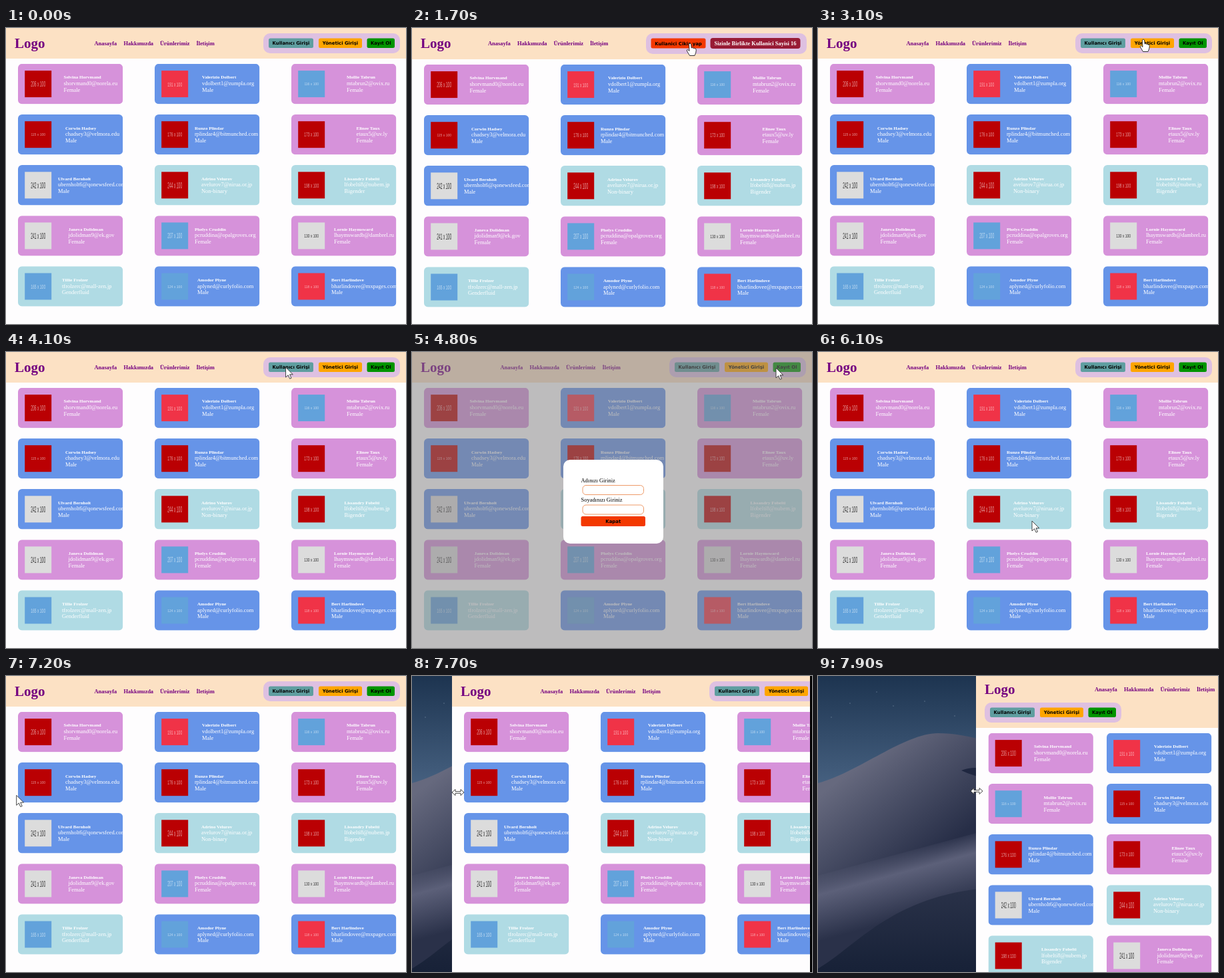
Write an HTML page that moves like this. It is 600 px wide and 445 px high and loops after 8 s.

```html
<!DOCTYPE html>
<html lang="tr">
<head>
<meta charset="utf-8">
<title>Üye listesi</title>
<style>
html, body { margin: 0; width: 100%; height: 100%; overflow: hidden; background: #fefdfe; }
svg { display: block; }
text { font: 8.45px "Liberation Serif", "Times New Roman", serif; }
.bold { font-weight: bold; }
.logo { font-size: 21px; font-weight: bold; }
.name { font-size: 7px; font-weight: bold; }
.heavy { font: bold 6.9px "DejaVu Sans", Verdana, sans-serif; text-anchor: middle; }
.size { font-family: "Liberation Sans", Arial, sans-serif; text-anchor: middle; }
</style>
</head>
<body>
<svg id="stage" width="600" height="445" viewBox="0 0 600 445">
  <defs>
    <linearGradient id="sky" x2="0" y2="1"><stop stop-color="#1d3450"/><stop offset="1" stop-color="#4a6585"/></linearGradient>
    <linearGradient id="dune" gradientUnits="userSpaceOnUse" x1="90" y1="110" x2="200" y2="250">
      <stop stop-color="#66697e"/><stop offset=".4" stop-color="#4c5168"/><stop offset="1" stop-color="#272e47"/>
    </linearGradient>
    <linearGradient id="streak" gradientUnits="userSpaceOnUse" x1="110" y1="265" x2="145" y2="395">
      <stop stop-color="#5c6079" stop-opacity="0"/><stop offset=".25" stop-color="#5c6079"/><stop offset=".75" stop-color="#2a3149"/>
    </linearGradient>
    <linearGradient id="near" x2="0" y2="1"><stop stop-color="#2a3249"/><stop offset="1" stop-color="#172137"/></linearGradient>
  </defs>
  <g id="desktop">
    <rect width="260" height="180" fill="url(#sky)"/>
    <path d="M88 24h0M48 41h0M113 45h0M20 62h0M160 38h0M205 60h0" stroke="#9fb0c4" stroke-linecap="round"/>
    <path d="M0 161C60 145 130 86 180 86Q215 86 260 100V445H0z" fill="url(#dune)"/>
    <path d="M215 142Q235 134 260 142V154Q235 152 215 142z" fill="#1f2740"/>
    <path d="M0 300L260 230V445H0z" fill="url(#streak)"/>
    <path d="M0 440C60 405 110 330 260 318V445H0z" fill="url(#near)"/>
  </g>
  <g id="page">
    <rect width="600" height="445" fill="#fefdfe"/>
    <g id="content">
      <rect id="bar" width="600" fill="#fce1c4"/>
      <g fill="#740080">
        <text id="logo" class="logo" x="13">Logo</text>
        <g id="nav"></g>
      </g>
      <g id="guest"></g>
      <g id="member"></g>
      <g id="cards"></g>
    </g>
    <g id="modal">
      <rect width="600" height="445" opacity=".255"/>
      <rect x="227" y="162" width="150" height="126" rx="10" fill="#fff"/>
      <text x="253.5" y="196">Adınızı Giriniz</text>
      <text x="253.5" y="225">Soyadınızı Giriniz</text>
      <g fill="#fff" stroke="#ee9a68">
        <rect x="256" y="200.5" width="91.5" height="14" rx="5"/>
        <rect x="256" y="230" width="91.5" height="14" rx="5"/>
      </g>
    </g>
  </g>
  <rect id="strip" x="597" width="3" height="445"/>
  <g id="cursor" stroke-linejoin="round">
    <path id="arrow" d="M0 0V15L3.6 11.7L6.1 17.2L8.5 16.2L6 10.8H10.8z" fill="#fff" stroke="#333" stroke-width=".9"/>
    <path id="hand" d="M-1.6 1Q0-1 1.5 1L2.2 7Q4 5.5 5 7.5Q6.5 6 7.3 8.2Q9 7.5 9.3 9.5L8.8 14L7 18.5H-.5L-4.3 12Q-5.5 9.5-3.6 9.3L-1 11.5z" fill="#fff" stroke="#222" stroke-width=".9"/>
    <path id="resize" d="M-9 0L-4-4.5V-1.3H4V-4.5L9 0L4 4.5V1.3H-4V4.5z" fill="#fff" stroke="#333" stroke-width=".9"/>
  </g>
</svg>
<script>
const $ = id => document.getElementById(id);

function add(parent, tag, attrs, text = '') {
  const el = document.createElementNS('http://www.w3.org/2000/svg', tag);
  for (const key in attrs) el.setAttribute(key, attrs[key]);
  el.textContent = text;
  return parent.appendChild(el);
}
const rect = (parent, x, y, width, height, rx, fill) => add(parent, 'rect', { x, y, width, height, rx, fill });

function button(parent, x, y, width, height, fill, label) {
  rect(parent, x, y, width, height, 2.5, fill);
  return add(parent, 'text', { x: x + width / 2, y: y + height / 2 + 2.6, class: 'heavy' }, label);
}
const show = (id, on) => $(id).style.display = on ? '' : 'none';
const move = (id, x, y) => $(id).setAttribute('transform', `translate(${x} ${y})`);

// Header
[['Anasayfa', 132.5], ['Hakkımızda', 176.5], ['Ürünlerimiz', 231], ['İletişim', 285.5]]
  .forEach(([label, x]) => add($('nav'), 'text', { x, y: 26, class: 'bold' }, label));
rect($('guest'), 386, 8, 205, 30, 10, '#dec0e1');
button($('guest'), 394, 15.5, 67, 14.5, '#5f9ea0', 'Kullanıcı Girişi');
button($('guest'), 469, 15.5, 65, 14.5, '#ffa500', 'Yönetici Girişi');
button($('guest'), 541.5, 15.5, 41.5, 14.5, '#009400', 'Kayıt Ol');
rect($('member'), 351, 8, 241, 31, 10, '#dec0e1');
const exitLabel = button($('member'), 358.5, 15.5, 82, 15, '#f33800', '');
rect($('member'), 447.5, 15, 135, 16, 4, '#981b35');
add($('member'), 'text', { x: 515, y: 26, fill: '#fff', class: 'bold', 'text-anchor': 'middle' },
  'Sizinle Birlikte Kullanici Sayisi 16');
button($('modal'), 253.5, 247, 96.5, 15, '#f33800', 'Kapat');

// Cards: name, mail, gender, picture width and tone, left edge of the text
const people = `Selvina Horvmand|shorvmand0@norela.eu|Female|206|dark|68.5
Valerizio Dolbert|vdolbert1@zumpla.org|Male|191|red|71
Mollie Tabrun|mtabrun2@ovix.ru|Female|116|blue|83
Corwin Hadsey|chadsey3@velmora.edu|Male|115|dark|71
Runzo Plindar|rplindar4@bitmunched.com|Male|176|dark|60
Elinee Taux|etaux5@uv.ly|Female|173|dark|97.5
Ulvard Bernholt|ubernholt6@qonewsfeed.com|Male|242|grey|60
Adrino Velurov|avelurov7@nirua.or.jp|Non-binary|244|dark|70
Lissandry Fobelti|lfobelti8@nubem.jp|Bigender|198|dark|79.5
Janeva Dolidman|jdolidman9@ek.gov|Female|241|grey|75.5
Phelys Cruddin|pcruddina@opalgroves.org|Female|207|blue|60
Lornie Haymsward|lhaymswardb@dambrel.ru|Female|130|grey|64
Tillie Frolzer|tfrolzerc@mall-zen.jp|Genderfluid|165|blue|66
Amodor Plyne|aplyned@curlyfolio.com|Male|124|blue|64
Bert Harlindove|bharlindovee@mxpages.com|Male|118|red|60`.split('\n').map(line => line.split('|'));
const tones = { dark: '#ba0003', red: '#f03347', blue: '#62a2db', grey: '#dcdcdc' };
const fills = { Male: '#6694e8', Female: '#d692da' };

const cards = people.map(([name, mail, gender, wide, tone, x]) => {
  const card = add($('cards'), 'svg', { width: 157.5, height: 60.5 });
  rect(card, 0, 0, 157.3, 60.3, 6, fills[gender] || '#b0dbe4');
  rect(card, 10.2, 10.2, 40, 40, 0, tones[tone]);
  // The picture is squeezed into a square, and its caption with it.
  add(card, 'text', {
    class: 'size', style: `font-size:${wide / 8}px`, y: wide / 22,
    transform: `translate(30.2 30.2) scale(${40 / wide} .4)`,
    fill: tone == 'grey' ? '#222' : '#fff', opacity: tone == 'grey' ? .9 : .6
  }, wide + ' x 100');
  add(card, 'text', { x, y: 22.5, fill: '#fff', class: 'name' }, name);
  add(card, 'text', { x, y: 32.3, fill: '#fff' }, mail);
  add(card, 'text', { x, y: 42, fill: '#fff' }, gender);
  return card;
});

// Pointer: time, x, y, and shape from that time on
const path = [
  [300, 360, 130, 'arrow'], [800, 428, 23, 'hand'], [1300, 428, 23, 'hand'], [1700, 417, 23, 'hand'],
  [2100, 416, 23, 'arrow'], [2700, 470, 22, 'hand'], [3100, 488, 17, 'hand'], [3400, 488, 19, 'arrow'],
  [3800, 405, 23, 'hand'], [4000, 405, 23, 'arrow'], [4500, 545, 23, 'hand'], [4700, 546, 24, 'arrow'],
  [4900, 546, 24, 'arrow'], [5500, 305, 254, 'hand'], [5800, 310, 254, 'arrow'], [6100, 321, 254, 'arrow'],
  [6500, 321, 254, 'arrow'], [7300, 2, 176, 'resize'], [7500, 2, 176, 'resize'], [7600, 18, 176, 'resize'],
  [7700, 69, 175, 'resize'], [7800, 153, 174, 'resize'], [7900, 238, 173, 'resize']
];
const edges = [0, 12, 60, 150, 237];

function drawCursor(t) {
  show('cursor', t >= path[0][0]);
  const i = Math.max(0, path.findLastIndex(p => p[0] <= t));
  const a = path[i], b = path[i + 1] || a;
  const k = b == a ? 0 : Math.max(0, (t - a[0]) / (b[0] - a[0]));
  const s = k * k * (3 - 2 * k);
  move('cursor', a[1] + (b[1] - a[1]) * s, a[2] + (b[2] - a[2]) * s);
  for (const shape of ['arrow', 'hand', 'resize']) show(shape, shape == a[3]);
}

function draw(time) {
  const t = Math.floor(time / 100) * 100;
  const user = t >= 1300 && t < 2100, admin = t >= 3400 && t < 4000;
  const member = user || admin, modal = t >= 4700 && t < 5800;
  const edge = edges[Math.max(0, (t - 7500) / 100)];
  const narrow = edge > 100;
  const barHeight = narrow ? 78 : member ? 47 : 46;

  move('page', edge, 0);
  show('desktop', edge);
  show('strip', edge && !narrow);
  $('content').setAttribute('opacity', modal ? .65 : 1);
  show('modal', modal);
  show('guest', !member);
  show('member', member);
  exitLabel.textContent = admin ? 'Yonetici Cikis yap' : 'Kullanici Cikis yap';

  $('bar').setAttribute('height', barHeight);
  $('logo').setAttribute('y', narrow ? 27 : 30);
  move('nav', narrow ? 282.5 - edge : member ? -18.5 : 0, narrow ? -3 : 0);
  move('guest', narrow ? -373 : 0, narrow ? 32 : 0);
  const columns = narrow ? [18.5, 433 - edge] : [18, 223, 428];
  cards.forEach((card, i) => {
    card.setAttribute('x', columns[i % columns.length]);
    card.setAttribute('y', barHeight + 7.9 + 76.1 * Math.floor(i / columns.length));
  });
  drawCursor(t);
}

const start = performance.now();
function tick() {
  draw((performance.now() - start) % 8000);
  requestAnimationFrame(tick);
}
tick();
</script>
</body>
</html>
```
